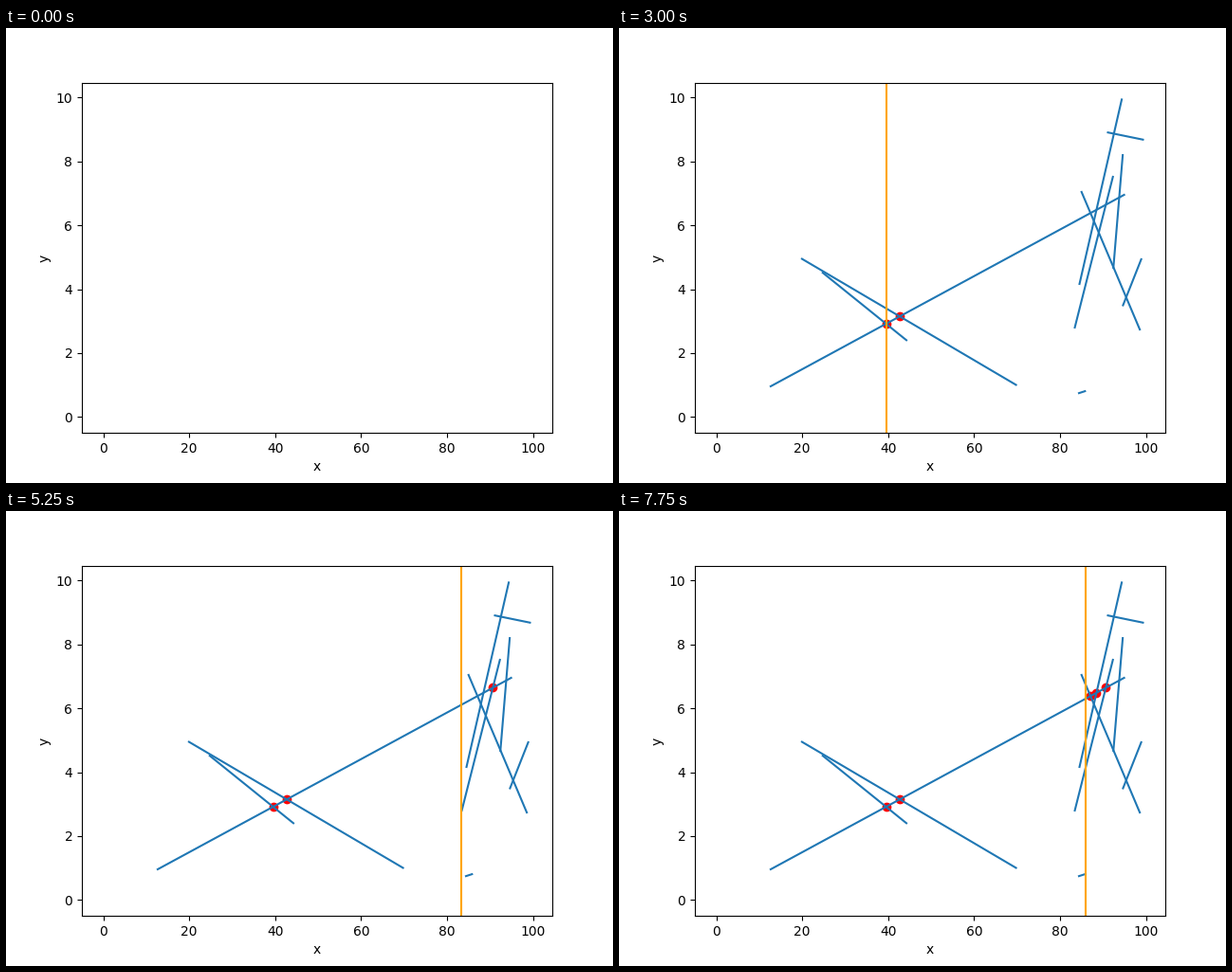
A matplotlib script for the animation above (8000 ms loop, 640 px wide and 480 px high).

```python
import numpy as np
import matplotlib.pyplot as plt
from matplotlib.animation import FuncAnimation
from matplotlib.collections import LineCollection

FRAMES = 32
INTERVAL = 250

# Each segment runs from its left end to its right end.
SEGMENTS = [
    ((12.46, 0.947), (95.10, 6.970)),
    ((19.74, 4.967), (69.94, 0.991)),
    ((24.59, 4.537), (44.42, 2.386)),
    ((83.36, 2.772), (92.34, 7.549)),
    ((84.17, 0.739), (86.01, 0.819)),
    ((84.46, 4.136), (94.39, 9.970)),
    ((84.90, 7.074), (98.63, 2.712)),
    ((90.90, 8.914), (99.50, 8.677)),
    ((92.38, 4.641), (94.59, 8.231)),
    ((94.55, 3.469), (98.96, 4.967)),
]
X_MAX, Y_MAX = 99.5, 9.97
MARGIN = 0.05


def slope(seg):
    (x0, y0), (x1, y1) = seg
    return (y1 - y0) / (x1 - x0)


def height(seg, x):
    return seg[0][1] + slope(seg) * (x - seg[0][0])


def crossing(a, b):
    """Point where two segments meet, or None."""
    dm = slope(a) - slope(b)
    if dm == 0:
        return None
    x = (height(b, 0) - height(a, 0)) / dm
    if max(a[0][0], b[0][0]) <= x <= min(a[1][0], b[1][0]):
        return x, height(a, x)
    return None


def sweep():
    """Yield (segments shown, sweep line x or None, dots found) per frame."""
    yield False, None, []
    yield True, None, []
    queue = [0.0] + [end[0] for seg in SEGMENTS for end in seg]
    found = {}
    while queue:
        x = min(queue)
        queue.remove(x)
        yield True, x, list(found.values())

        # Only neighbours along the sweep line can meet next.
        after = x + 1e-6
        active = [s for s in SEGMENTS if s[0][0] <= after < s[1][0]]
        active.sort(key=lambda s: height(s, after))
        fresh = False
        for a, b in zip(active, active[1:]):
            key = frozenset((a, b))
            point = crossing(a, b)
            if point and point[0] > x and key not in found:
                found[key] = point
                queue.append(point[0])
                fresh = True
        if fresh:
            yield True, x, list(found.values())
        yield True, None, list(found.values())


states = [state for state, _ in zip(sweep(), range(FRAMES))]

fig, ax = plt.subplots(figsize=(6.4, 4.8), dpi=100)
ax.set_xlim(-MARGIN * X_MAX, (1 + MARGIN) * X_MAX)
ax.set_ylim(-MARGIN * Y_MAX, (1 + MARGIN) * Y_MAX)
ax.set_xlabel("x")
ax.set_ylabel("y")

lines = ax.add_collection(LineCollection(SEGMENTS, colors="C0", linewidths=1.5),
                          autolim=False)
dots = ax.scatter([], [], color="red")
sweep_line = ax.axvline(0, color="orange", zorder=2.1)


def draw(i):
    shown, x, points = states[i]
    lines.set_visible(shown)
    dots.set_offsets(np.array(points).reshape(-1, 2))
    sweep_line.set_visible(x is not None)
    if x is not None:
        sweep_line.set_xdata([x, x])
    return lines, dots, sweep_line


anim = FuncAnimation(fig, draw, frames=FRAMES, interval=INTERVAL,
                     repeat=True, repeat_delay=0)
plt.show()
```
